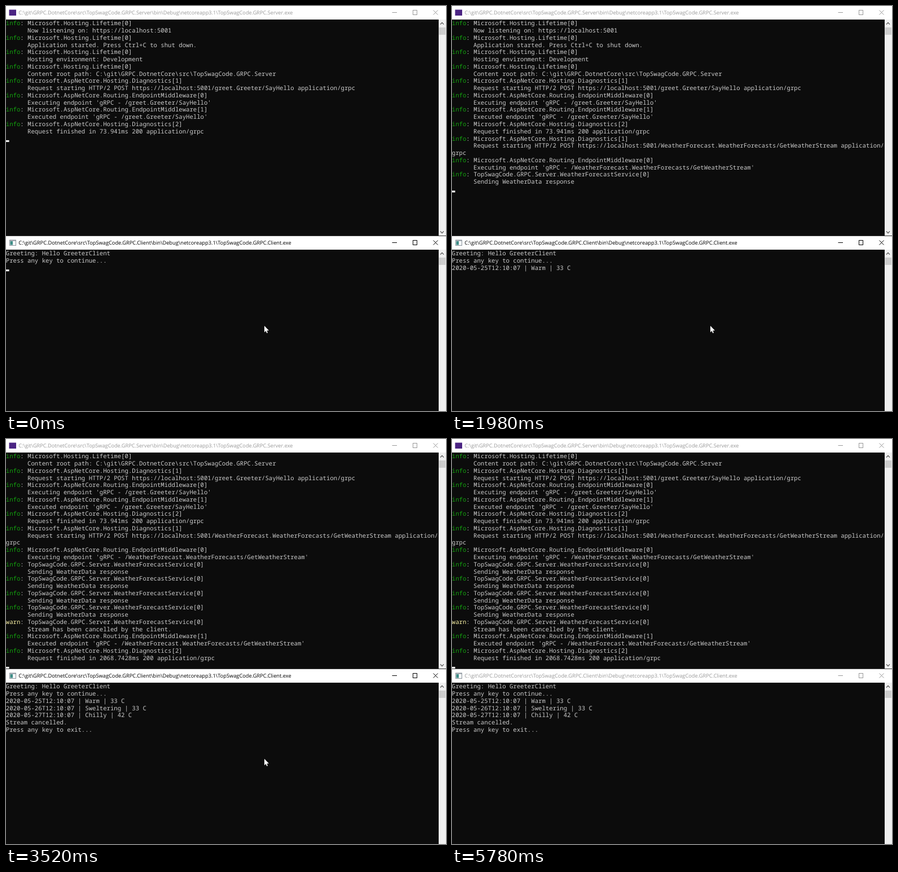
Write an HTML page with a canvas that moves like this. It is 780 px wide and 718 px high and loops after 5900 ms.

```html
<!DOCTYPE html>
<html lang="en">
<head>
<meta charset="utf-8">
<title>gRPC stream in two consoles</title>
<style>
  html, body { margin: 0; width: 100%; height: 100%; overflow: hidden; background: #0c0c0c; }
  canvas { display: block; }
</style>
</head>
<body>
<canvas id="stage" width="780" height="718"></canvas>
<script>
const ctx = document.getElementById('stage').getContext('2d');
const LOOP = 5900, CELL_W = 6.39, CELL_H = 12.77, LEFT = -0.2, ROWS = 30;
const MONO = '500 10.65px "Noto Sans Mono", "DejaVu Sans Mono", monospace';

const entry = (source, text, level = 'info') => [`${level}: ${source}`, ...text.split('\n').map((s, i) => i ? s : '      ' + s)];
const lifetime = text => entry('Microsoft.Hosting.Lifetime[0]', text);
const diagnostics = (id, text) => entry(`Microsoft.AspNetCore.Hosting.Diagnostics[${id}]`, text);
const routing = (id, verb, path) =>
  entry(`Microsoft.AspNetCore.Routing.EndpointMiddleware[${id}]`, `${verb} endpoint 'gRPC - ${path}'`);
const service = (text, level) => entry('TopSwagCode.GRPC.Server.WeatherForecastService[0]', text, level);

const GREET = '/greet.Greeter/SayHello';
const STREAM = '/WeatherForecast.WeatherForecasts/GetWeatherStream';
const sending = service('Sending WeatherData response');

const serverLog = [
  lifetime('Now listening on: https://localhost:5001'),
  lifetime('Application started. Press Ctrl+C to shut down.'),
  lifetime('Hosting environment: Development'),
  lifetime('Content root path: C:\\git\\GRPC.DotnetCore\\src\\TopSwagCode.GRPC.Server'),
  diagnostics(1, `Request starting HTTP/2 POST https://localhost:5001${GREET} application/grpc`),
  routing(0, 'Executing', GREET),
  routing(1, 'Executed', GREET),
  diagnostics(2, 'Request finished in 73.941ms 200 application/grpc'),
  diagnostics(1, `Request starting HTTP/2 POST https://localhost:5001${STREAM} application/\ngrpc`),
  routing(0, 'Executing', STREAM),
  sending, sending, sending, sending,
  service('Stream has been cancelled by the client.', 'warn'),
  routing(1, 'Executed', STREAM),
  diagnostics(2, 'Request finished in 2068.7428ms 200 application/grpc'),
].flat();

const clientLog = [
  'Greeting: Hello GreeterClient',
  'Press any key to continue...',
  '2020-05-25T12:10:07 | Warm | 33 C',
  '2020-05-26T12:10:07 | Sweltering | 33 C',
  '2020-05-27T12:10:07 | Chilly | 42 C',
  'Stream cancelled.',
  'Press any key to exit...',
];

// [start ms, complete lines, characters of the next line]
const serverSteps = [[0, 16, 0], [1480, 21, 4], [1980, 23, 0], [2470, 25, 0], [2970, 27, 0], [3460, 27, 4], [3520, 35, 0]];
const clientSteps = [[0, 2, 0], [1980, 3, 0], [2470, 4, 0], [2970, 5, 0], [3460, 7, 0]];
const caretOn = [[0, 240], [740, 1300], [4450, 4990], [5470, 5780]];
const levelColors = { info: '#13a10e', warn: '#f9f1a5' };

function rect(x, y, w, h, color) {
  ctx.fillStyle = color;
  ctx.fillRect(x, y, w, h);
}

function line(color, width, ...points) {
  ctx.strokeStyle = color;
  ctx.lineWidth = width;
  ctx.beginPath();
  points.forEach(([x, y]) => ctx.lineTo(x, y));
  ctx.stroke();
}

function text(string, x, y, font, color) {
  ctx.font = font;
  ctx.fillStyle = color;
  ctx.fillText(string, x, y);
}

function drawLog(log, steps, top, t, caret) {
  const [, count, partial] = steps.findLast(step => t >= step[0]);
  const scroll = Math.max(0, count + 1 - ROWS);
  const lines = log.slice(scroll, count);
  if (partial) lines.push(log[count].slice(0, partial));
  lines.forEach((string, row) => {
    const y = top + row * CELL_H + 10.2;
    const level = string.slice(0, 4), color = levelColors[level];
    if (color) text(level, LEFT, y, MONO, color);
    text(color ? string.slice(4) : string, LEFT + (color ? 4 * CELL_W : 0), y, MONO, '#ccc');
  });
  if (caret) rect(LEFT - 0.6 + partial * CELL_W, top + (count - scroll + 1) * CELL_H - 3.2, CELL_W, 3.2, '#f2f2f2');
}

function drawWindow(top, bottom, name, fontSize, active) {
  const ink = active ? '#000' : '#999';
  rect(0, top, 780, 24, '#fff');
  text(`C:\\git\\GRPC.DotnetCore\\src\\TopSwagCode.GRPC.${name}\\bin\\Debug\\netcoreapp3.1\\TopSwagCode.GRPC.${name}.exe`,
    22.3, top + 15.3, `${fontSize}px "Open Sans", "Noto Sans", sans-serif`, ink);

  line(ink, 1, [684.5, top + 11.5], [693, top + 11.5]);
  ctx.strokeRect(721.5, top + 7.5, 7, 8);
  line(ink, 1, [757.5, top + 7.5], [765.5, top + 15.5]);
  line(ink, 1, [765.5, top + 7.5], [757.5, top + 15.5]);

  rect(0, top + 24, 767, bottom - top - 24, '#0c0c0c');
  rect(767, top + 24, 13, bottom - top - 24, '#f0f0f0');
  rect(767.5, top + 38, 11.5, 13, '#cdcdcd');
  chevron(top + 31, 1);
}

function chevron(y, direction) {
  line('#505050', 1.3, [770, y + 1.6 * direction], [773, y - 1.6 * direction], [776, y + 1.6 * direction]);
}

function drawClientIcon(top) {
  rect(6, top + 6.5, 12, 10.5, '#8b949c');
  rect(7, top + 8.5, 10, 7.5, '#f4f6f7');
  rect(7.5, top + 9, 4.5, 6.5, '#3d8c86');
}

// The pointer moves in 60 ms steps and leaves through the bottom edge.
function pointerAt(t) {
  const step = Math.max(0, Math.floor((t - 4570) / 60));
  if (step > 11) return null;
  if (step === 11) return [731, 714];
  const u = step / 10;
  const ease = (u * u * (3 - 2 * u)) ** 0.86;
  return [458 + 267 * ease, 567 + 145 * (ease + 0.4 * ease * (1 - ease))];
}

function drawPointer([x, y]) {
  const outline = [[0, 0], [0, 11.5], [2.6, 9.1], [4.3, 13], [6, 12.2], [4.4, 8.4], [8, 8.3]];
  ctx.fillStyle = '#fff';
  ctx.beginPath();
  outline.forEach(([dx, dy]) => ctx.lineTo(x + dx, y + dy));
  ctx.fill();
}

function draw(t) {
  const clientActive = t < 5780;
  drawWindow(0, 407, 'Server', 9.2, false);
  chevron(401, -1);
  rect(5.5, 6.5, 12.5, 10.5, '#4b2483');
  drawLog(serverLog, serverSteps, 24, t, true);

  rect(0, 407, 780, 1, clientActive ? '#333' : '#444');
  drawWindow(408, 718, 'Client', 9.28, clientActive);
  drawClientIcon(408);
  drawLog(clientLog, clientSteps, 432, t, caretOn.some(([from, to]) => t >= from && t < to));

  const pointer = pointerAt(t);
  if (pointer) drawPointer(pointer);
}

function tick() {
  draw(performance.now() % LOOP);
  requestAnimationFrame(tick);
}

ctx.textRendering = 'geometricPrecision';
tick();
</script>
</body>
</html>
```
